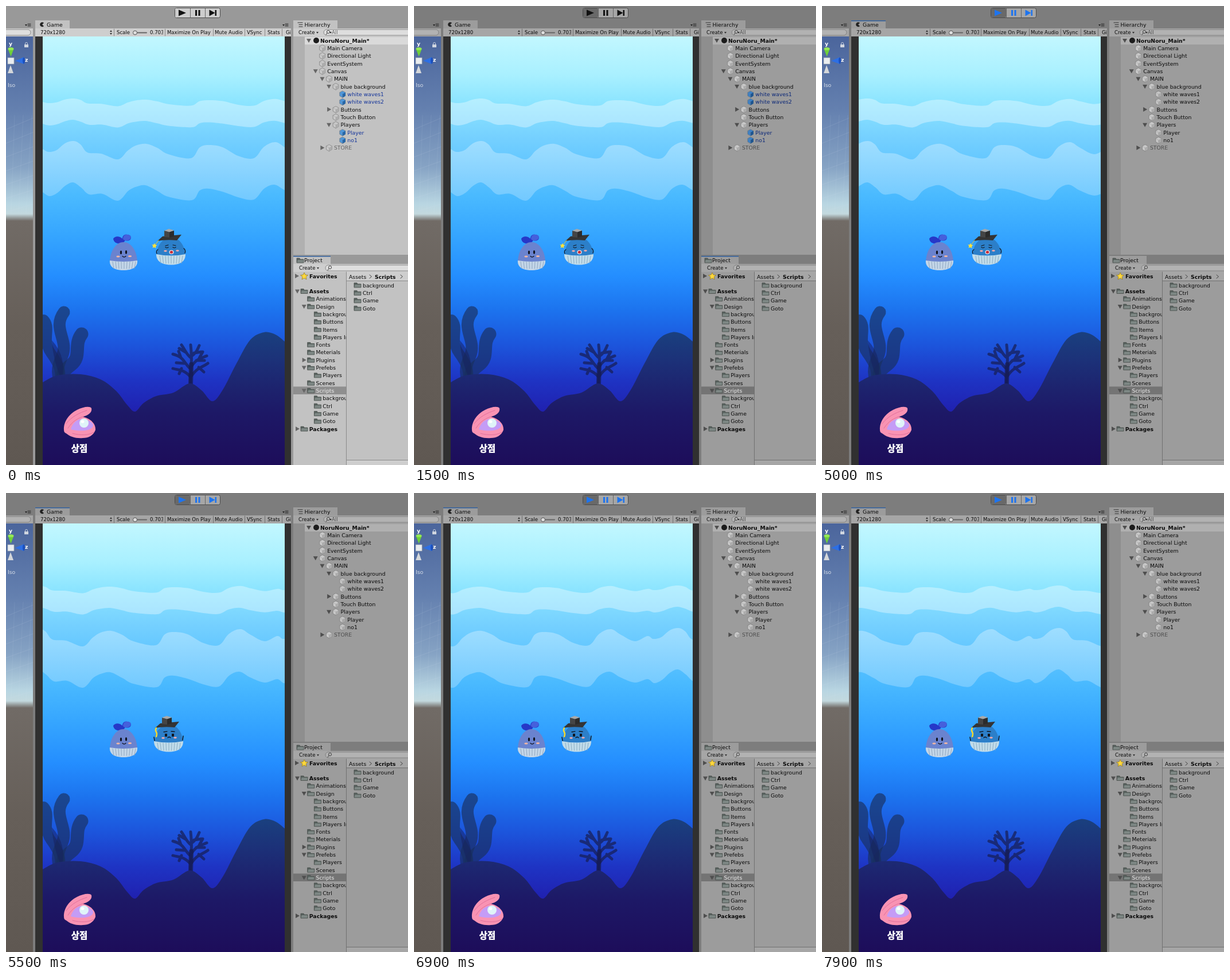
These frames come from a looping animation (701x799 px, 8 s). An HTML page:

```html
<!DOCTYPE html>
<html lang="en">
<head>
<meta charset="utf-8">
<title>Editor play mode</title>
<style>
html, body { margin: 0; width: 100%; height: 100%; overflow: hidden; background: #999; }
svg {
  display: block; width: 701px; height: 799px;
  font: 9.3px "DejaVu Sans", sans-serif;
}
#app {
  --frame: #999; --panel: #c2c2c2; --bar: #cecece; --gutter: #b0b0b0; --scene: #dadada;
  --line: #8a8a8a; --btn: #cdcdcd; --press: #cdcdcd; --icon: #111; --ink: #0a0a0a; --off: #666;
  --field: #dedede; --link: #14349a; --cube: #4d97dc; --cubeDark: #2566a8; --sel: #8f8f8f;
}
#app.play {
  --frame: #7d7d7d; --panel: #9c9c9c; --bar: #a6a6a6; --gutter: #8e8e8e; --scene: #b0b0b0;
  --line: #707070; --btn: #a6a6a6; --press: #696969; --field: #b2b2b2; --off: #4e4e4e;
  --sel: #747474; --link: #0c2878; --cube: #3d80c4; --cubeDark: #1d5590;
}
#app.run { --link: #0a0a0a; --cube: #c4c4c4; --cubeDark: #a9a9a9; }
#app.live { --icon: #1d74f0; }
text { white-space: pre; }
.s { font-size: 8.55px; }
.b { font-weight: bold; }
</style>
</head>
<body>
<script>
const put = (tag, attrs) => `<${tag} ${attrs}/>`;
const rect = (x, y, w, h, fill, more = '') =>
  put('rect', `x="${x}" y="${y}" width="${w}" height="${h}" style="fill:${fill}" ${more}`);
const path = (d, fill, more = '') => put('path', `d="${d}" style="fill:${fill}" ${more}`);
const line = (d, color, width = 1) =>
  put('path', `d="${d}" style="fill:none;stroke:${color};stroke-width:${width};stroke-linecap:round;stroke-linejoin:round"`);
const ell = (x, y, rx, ry, fill) =>
  put('ellipse', `cx="${x}" cy="${y}" rx="${rx}" ry="${ry}" style="fill:${fill}"`);
const text = (x, y, s, cls = '', color = 'var(--ink)') =>
  `<text x="${x}" y="${y}" class="${cls}" style="fill:${color}">${s}</text>`;
const gradient = (id, y1, y2, stops) =>
  `<linearGradient id="${id}" gradientUnits="userSpaceOnUse" x1="0" x2="0" y1="${y1}" y2="${y2}">` +
  stops.map(([y, c]) => `<stop offset="${(y - y1) / (y2 - y1)}" stop-color="${c}"/>`).join('') +
  '</linearGradient>';

// Smooth curve through points; the first move command is left to the caller.
function curve(p) {
  let d = '';
  for (let i = 0; i < p.length - 1; i++) {
    const a = p[i - 1] || p[i], b = p[i], c = p[i + 1], e = p[i + 2] || c;
    const n = [b[0] + (c[0] - a[0]) / 6, b[1] + (c[1] - a[1]) / 6,
               c[0] - (e[0] - b[0]) / 6, c[1] - (e[1] - b[1]) / 6, c[0], c[1]];
    d += 'C' + n.map(v => v.toFixed(1)).join(' ');
  }
  return d;
}

const PERIOD = 470;
function band(top, bottom, fill) {
  const twice = p => [...p, ...p.map(([x, y]) => [x + PERIOD, y])];
  const t = twice(top), b = twice(bottom).reverse();
  return path(`M${t[0]}${curve(t)}L${b[0]}${curve(b)}Z`, fill);
}

const arrow = (x, y, open) => path(open
  ? `M${x - 4} ${y - 3}h8l-4 7z` : `M${x - 3} ${y - 4}v8l7-4z`, 'var(--off)');
const caret = (x, y) => path(`M${x - 2} ${y - 1}h4l-2 3z`, '#333');

function cube(x, y, blue) {
  const [top, side] = blue ? ['var(--cube)', 'var(--cubeDark)'] : ['#c9c9c9', '#adadad'];
  return path(`M${x} ${y - 5.5}l5 2.5v6l-5 3l-5-3v-6z`, top, 'stroke="#777" stroke-width=".7"') +
    path(`M${x} ${y}l5-3v6l-5 3z`, side) + line(`M${x - 5} ${y - 3}l5 3v6`, '#8888', .7);
}
const folder = (x, y) =>
  path(`M${x - 6} ${y + 4}v-8h5l1 2h6v6z`, '#56605d', 'stroke="#474d4a" stroke-width=".8"') +
  path(`M${x - 5.5} ${y + 3.5}l1-4.500h10v4.500z`, '#7d8784');
const lens = (x, y) => put('circle', `cx="${x}" cy="${y}" r="2.6" fill="none" stroke="#444"`) +
  line(`M${x - 2} ${y + 2}l-2 3`, '#444');
const menu = (x, y) => path(`M${x} ${y - 1}h4l-2 3z`, '#222') +
  line(`M${x + 5} ${y - 2}h5m-5 2h5m-5 2h5`, '#333');
const search = (x, y) => rect(x, y - 5, 200, 10, 'var(--field)', 'rx="5" stroke="#777" stroke-width=".8"') + lens(x + 8, y - 1);

function toolbar() {
  return rect(0, 0, 701, 799, 'var(--frame)') +
    rect(294.5, 3.5, 79, 17, 'var(--btn)', 'rx="3" stroke="#4a4a4a"') +
    rect(295, 4, 26, 16, 'var(--press)', 'rx="2"') +
    line('M321.5 4v16M347.5 4v16', '#666') +
    path('M301 6.5v11l13-5.5zM330 7h3v10h-3zM335.5 7h3v10h-3zM354.5 6.5v11l10-5.5zM364.5 7h2.5v10h-2.5z', 'var(--icon)');
}

function sceneView() {
  let grid = '';
  for (let i = 0; i < 7; i++) grid += line(`M0 ${215 + i * 24}L47 ${195 + i * 25}`, '#d8e0ea30', .7);
  for (let i = 0; i < 4; i++) grid += line(`M${i * 15} 190L${i * 13 - 4} 360`, '#d8e0ea20', .7);
  return menu(33, 33) + rect(0, 39, 47, 14, 'var(--bar)') +
    rect(-20, 41, 63, 10, 'var(--field)', 'rx="5" stroke="#777" stroke-width=".8"') +
    rect(0, 53, 47, 746, 'url(#sky)') + grid +
    path('M8.5 88l-5-13h10z', '#6fd03a') + ell(8.5, 74.5, 5, 2.5, '#95ea55') +
    rect(3, 90, 11, 11, '#e9edf0', 'stroke="#9aa3ad" stroke-width=".7"') +
    path('M16 95.5L31 89v12z', '#2d6fe4') + ell(31, 95, 2, 5.5, '#1b50bd') +
    path('M8 103l5 14h-10z', '#d4d7da') +
    text(5, 69, 'y', 'b', '#fff') + text(33, 97, 'z', 'b', '#fff') + text(3, 141, 'Iso', '', '#d5dce6') +
    rect(32, 67, 7, 5, '#cfd5df') + line('M33.5 67v-1.5a2 2 0 0 1 4 0v1.5', '#cfd5df');
}

function gamePanel() {
  const labels = [[60, '720x1280'], [193, 'Scale'], [281, 'Maximize On Play'], [364, 'Mute Audio'],
    [420, 'VSync'], [456, 'Stats']];
  return rect(51, 25, 60, 15, 'var(--panel)') + rect(51, 25, 60, 1.5, '#2f5f9e', 'id="gameFocus"') +
    path('M66 29.5a4 4 0 1 0 0 5.5l-3-2.8z', '#222') + text(71, 36, 'Game') + menu(482, 33) +
    rect(51, 39, 446, 14, 'var(--bar)') +
    line('M188.5 40v12M277.5 40v12M361.5 40v12M416.5 40v12M451.5 40v12M481.5 40v12', 'var(--line)') +
    labels.map(([x, s]) => text(x, 49, s, 's')).join('') +
    `<svg x="251" y="39" width="23" height="14">${text(0, 10, '0.703', 's')}</svg>` +
    `<svg x="488" y="39" width="9" height="14">${text(0, 10, 'Gizmos', 's')}</svg>` +
    path('M181 45h4l-2-3zM181 47h4l-2 3z', '#333') + line('M228 46.5h17', '#666', 2) +
    put('circle', 'cx="225" cy="46.5" r="3.5" fill="#ddd" stroke="#555"') +
    rect(51, 53, 446, 746, '#303030');
}

function whale1() {
  let ribs = '';
  for (let x = 186; x < 227; x += 5) ribs += `M${x} 445l${(205 - x) * .1} 12`;
  return path('M204 413C196 415 188 413 187 405C191 399 199 401 203 405C203 397 211 396 217 400C220 407 214 410 208 408z', '#2638c8') +
    path('M204 406C204 397 212 396 217 400C219 406 214 409 207 408z', '#4560dc') +
    path('M181 445C182 424 193 411 205 411S228 424 229 445z', '#6a83cf') +
    path('M181 443Q205 447 229 443C230 454 221 460 205 460S180 454 181 443z', '#c3d6e8') +
    line(ribs, '#8ba2bd', .9) +
    ell(200.5, 429, 1.6, 3.3, '#10131f') + ell(209.5, 428.5, 1.6, 3.3, '#10131f') +
    ell(195.5, 436, 3, 1.5, '#efb6a6') + ell(216, 435.5, 3, 1.5, '#efb6a6') +
    '<g id="smile">' + line('M203 435.5q3 3 6 0', '#10131f', 1.2) + '</g>' +
    '<g id="sing">' + ell(205.5, 436.5, 3.8, 3.4, '#f2f2f2') + ell(205.5, 436.5, 2.8, 2.4, '#d02b3a') + '</g>';
}

// The second whale in its singing (true) or resting (false) pose.
function whale2(sing) {
  let ribs = '';
  for (let x = 268; x < 310; x += 5) ribs += `M${x} 435l${(288 - x) * .1} 13`;
  const ink = '#12161f';
  const face = sing
    ? line('M278 417.5l5-1.5M291 416l5 1M278 420q2.5 2 5 0M291 420q2.5 2 5 0', ink, 1.2) +
      ell(288.5, 428.5, 4, 3.5, '#f4f4f4') + ell(288.5, 428.5, 2.8, 2.5, '#c8303c') +
      line('M263 431q-2-5 2-7M312 430q2-5-2-8', ink, 1.2)
    : rect(281, 419, 4, 5, ink) + rect(293, 419, 4, 5, ink) +
      line('M279 416l6-.8M292 415l6 .5M286 426q2.5-2.5 5 0', ink, 1.3) +
      line('M263 431l-1-6M312 430l1-7', ink, 1.5);
  const tassel = sing
    ? line('M266 408l-6 8', '#e8c52c') + path('M259 413l1.5 3h3l-2.5 2.5l.5 3l-3-1.5l-3 1l1-3l-2-2.5h3z', '#ffe23a')
    : line('M266 409q-2 4 0 7t0 8', '#f5d92e', 2.5);
  return `<g id="${sing ? 'poseA' : 'poseB'}" ${sing ? '' : 'transform="translate(-4 0)"'}>` +
    path('M263 434C263 413 276 403 288 403S311 413 313 434z', '#2c7fc9') +
    path('M262 432Q288 437 313 432C313 444 305 450.5 288 450.5S262 444 262 432z', '#c1dcea') +
    line(ribs, '#86a9bf', .9) + ell(278, 426.5, 2.8, 1.4, '#f0a9ad') + ell(299, 426, 2.8, 1.4, '#f0a9ad') + face +
    path('M264 409L273 401L306 398L298 408Q280 406 264 409z', '#343434') +
    path('M276 391l9 2v10l-9-1z', '#454545') + path('M285 393l8-2v10l-8 2z', '#2b2b2b') +
    path('M276 391l8-3l9 2.5l-8 3z', '#a9a9a9') + tassel + '</g>';
}

function plants() {
  const weed = (d, w) => line(d, '#19305fa8', w);
  const twigs = 'M322 660C321 640 326 625 322 590M322 646C311 632 300 634 291 631M320 630C309 619 310 611 291 606' +
    'M323 628C331 615 338 614 350 609M322 646C334 628 341 630 352 622M322 612C314 606 312 598 306 590' +
    'M323 610C333 603 334 597 337 591M305 612L301 601M337 613L343 602M306 631L302 640M336 629L345 637' +
    'M310 622L297 621M332 617L346 617M314 603L302 596M328 604L341 602';
  return weed('M66 546C80 560 62 582 78 604S96 636 94 654', 18) +
    weed('M101 533C80 561 110 582 98 609S92 640 92 650', 21) +
    weed('M132 571C117 590 133 610 113 625S103 641 98 652', 23) +
    path('M80 582Q107 612 97 651Q82 618 80 582z', '#17205c80') +
    line(twigs, '#171c50b0', 5) + line('M322 658L323 624', '#15194aa0', 8);
}

function clam() {
  return path('M101 738C100 722 112 709 124 703C134 698 146 696 149 700C151 708 142 713 134 715C148 718 157 728 156 738C152 748 144 752 134 752C122 753 112 750 105 744C102 743 101 741 101 738z', '#f993b3') +
    path('M113 737C116 725 126 717 137 719C148 722 155 728 151 733C146 740 128 741 113 737z', '#c49cf6') +
    line('M105 727C114 715 128 708 141 704M108 735C116 722 127 717 136 714M116 744C130 748 145 747 153 742', '#dd6d98', .9) +
    put('circle', 'cx="136" cy="726" r="8" fill="#dff4f8"') + ell(133.5, 723.5, 3, 2.5, '#fff') +
    `<text x="128" y="776" text-anchor="middle" style="font:900 15.5px 'Noto Sans CJK KR','Noto Sans CJK',sans-serif;fill:#fff;stroke:#fff;stroke-width:.6">상점</text>`;
}

function game() {
  const top = [[64, 249], [74, 254], [88, 251], [103, 239], [118, 235], [130, 241], [142, 255], [166, 257], [195, 267],
    [212, 252], [226, 243], [245, 240], [264, 247], [283, 258], [322, 265], [338, 246], [355, 242], [378, 246],
    [405, 261], [432, 265], [450, 245], [470, 237], [488, 247], [512, 258]];
  const bottom = [[64, 324], [76, 331], [90, 325], [103, 313], [117, 307], [131, 316], [145, 328], [168, 327], [195, 339],
    [213, 322], [226, 315], [243, 312], [264, 322], [283, 332], [324, 338], [338, 321], [354, 318], [380, 324],
    [405, 333], [432, 337], [450, 318], [468, 311], [487, 321], [512, 330]];
  // The distant band has the same outline, flattened.
  const flat = (p, from, to) => p.map(([x, y]) => [x, to + (y - from) * .42]);
  const far = band(flat(top, 235, 161), flat(bottom, 307, 198), '#ffffff58');
  const near = band(top, bottom, 'url(#foam)');
  const hills = [[64, 655], [90, 643], [130, 641], [165, 650], [192, 670], [211, 694], [225, 706], [240, 691],
    [262, 679], [292, 673], [320, 657], [341, 669], [360, 688], [378, 668], [402, 622], [426, 581], [450, 568], [470, 572], [486, 584]];
  return '<g clip-path="url(#stage)">' + rect(64, 53, 422, 746, 'url(#sea)') +
    `<g id="waves">${far}${near}</g>` + plants() +
    path(`M${hills[0]}${curve(hills)}V799H64z`, 'url(#ground)') + clam() + whale1() + whale2(true) + whale2(false) + '</g>';
}

function hierarchy() {
  // depth, label, fold state (1 open, 0 closed), style (b blue, o off)
  const rows = [[1, 'Main Camera'], [1, 'Directional Light'], [1, 'EventSystem'], [1, 'Canvas', 1], [2, 'MAIN', 1],
    [3, 'blue background', 1], [4, 'white waves1', , 'b'], [4, 'white waves2', , 'b'], [3, 'Buttons', 0],
    [3, 'Touch Button'], [3, 'Players', 1], [4, 'Player', , 'b'], [4, 'no1', , 'b'], [2, 'STORE', 0, 'o']];
  return rect(501, 25, 77, 15, 'var(--panel)') + line('M509 29h2m1 0h5M511 32.5h6M511 36h6', '#333', 1.2) +
    text(520.5, 36, 'Hierarchy') + rect(501, 39, 200, 14, 'var(--bar)') + text(510, 49, 'Create', 's') + caret(543, 46) +
    search(554, 46) + caret(566, 46) + text(568, 49, 'All', 's', 'var(--off)') +
    rect(501, 53, 200, 380, 'var(--panel)') + rect(501, 53, 20, 380, 'var(--gutter)') +
    rect(521, 54, 180, 13, 'var(--scene)') + rect(501, 120, 200, 13, 'var(--sel)', 'id="hover"') +
    arrow(528, 60, 1) + put('circle', 'cx="541" cy="60" r="5" fill="#1c1c1c"') + text(548, 63.5, 'NoruNoru_Main*', 'b') +
    rows.map(([depth, label, fold, style], i) => {
      const x = 540 + depth * 11.7, y = 73.3 + i * 13.35;
      const color = style === 'b' ? 'var(--link)' : style === 'o' ? 'var(--off)' : 'var(--ink)';
      return (fold === undefined ? '' : arrow(x - 12, y, fold)) + cube(x, y, style === 'b') + text(x + 8.5, y + 3.5, label, '', color);
    }).join('');
}

function project() {
  const tree = [[0, 'Assets', 1], [1, 'Animations'], [1, 'Design', 1], [2, 'background'], [2, 'Buttons'], [2, 'Items'],
    [2, 'Players Image'], [1, 'Fonts'], [1, 'Meterials'], [1, 'Plugins', 0], [1, 'Prefebs', 1], [2, 'Players'],
    [1, 'Scenes'], [1, 'Scripts', 1], [2, 'background'], [2, 'Ctrl'], [2, 'Game'], [2, 'Goto'], [0, 'Packages', 0]];
  const star = 'M520 464l2 4l4.5.5l-3.5 3l1 4.5l-4-2.3l-4 2.3l1-4.5l-3.5-3l4.5-.5z';
  return rect(501, 435, 65, 15, 'var(--panel)') + rect(501, 435, 65, 1.5, '#2f5f9e', 'id="projectFocus"') +
    folder(513, 443) + text(520, 446, 'Project') +
    rect(501, 449, 200, 14, 'var(--bar)') + text(511, 459, 'Create', 's') + caret(544, 456) + search(557, 456) +
    rect(501, 463, 200, 336, 'var(--panel)') + rect(594, 463, 107, 15, 'var(--bar)') + line('M594 478.5h107', 'var(--line)') +
    rect(501, 662.5, 92, 13.5, 'var(--sel)') +
    arrow(507, 470, 0) + path(star, '#ffd83b', 'stroke="#8c7420" stroke-width=".7"') + text(529, 473.5, 'Favorites', 'b') +
    '<g clip-path="url(#treeBox)">' + tree.map(([depth, label, fold], i) => {
      const x = 520 + depth * 11.7, y = 496.5 + i * 13.31;
      return (fold === undefined ? '' : arrow(x - 12, y, fold)) + folder(x, y) +
        text(x + 8.8, y + 3.5, label, depth ? '' : 'b', label === 'Scripts' ? '#eee' : 'var(--ink)');
    }).join('') + '</g>' + line('M593.5 463v336', 'var(--line)') +
    text(598, 474.5, 'Assets') + text(643, 474.5, 'Scripts', 'b') +
    line('M634 468l3.5 3l-3.5 3M688 468l3.5 3l-3.5 3', '#444') +
    ['background', 'Ctrl', 'Game', 'Goto'].map((s, i) => folder(613, 486 + i * 13.4) + text(622, 489.5 + i * 13.4, s)).join('') +
    rect(594, 790, 107, 9, 'var(--bar)') + line('M594 790.5h107', 'var(--line)');
}

document.body.innerHTML = '<svg id="app" viewBox="0 0 701 799"><defs>' +
  gradient('sea', 53, 799, [[53, '#c2f7ff'], [120, '#a9f0ff'], [165, '#8de5ff'], [230, '#75d0ff'], [330, '#4abaff'],
    [400, '#35a5ff'], [470, '#248eff'], [530, '#1c73ee'], [590, '#1c55dc'], [650, '#1e34c4'], [710, '#201fae'], [799, '#201a90']]) +
  gradient('ground', 568, 799, [[568, '#1a407f'], [620, '#1c3078'], [665, '#1d236e'], [710, '#1d1866'], [799, '#1d0d5a']]) +
  gradient('foam', 235, 340, [[235, '#ffffff50'], [340, '#ffffff3c']]) +
  gradient('sky', 53, 799, [[53, '#4b659c'], [180, '#6480af'], [280, '#86a3c4'], [345, '#b9d6e2'], [362, '#c3d9de'],
    [374, '#716b66'], [560, '#665f59'], [799, '#5f5852']]) +
  '<clipPath id="stage"><rect x="64" y="53" width="422" height="746"/></clipPath>' +
  '<clipPath id="treeBox"><rect x="501" y="463" width="92" height="336"/></clipPath></defs>' +
  toolbar() + sceneView() + gamePanel() + game() + hierarchy() + project() + '</svg>';

const $ = id => document.getElementById(id);
const app = $('app'), waves = $('waves');
const show = (id, on) => { $(id).style.display = on ? '' : 'none'; };
const within = (t, a, b) => t >= a && t < b;

function draw() {
  const t = Math.floor(performance.now() % 8000 / 100) * 100;
  const playing = t >= 4100;
  // Game clock: it stalls while loading, then jumps ahead.
  const clock = t < 4600 ? 0 : .4 + (t - 4600) / 1000;
  app.classList.toggle('play', t >= 1500);
  app.classList.toggle('run', playing);
  app.classList.toggle('live', t >= 4200);
  waves.setAttribute('transform', `translate(${(-47 * clock).toFixed(2)} 0)`);
  const sings = !playing || within(clock % 1.33, .55, 1);
  const open = within(clock % 2.33, 1.5, 2);
  show('poseA', sings);
  show('poseB', !sings);
  show('sing', open);
  show('smile', !open);
  show('hover', within(t, 200, 300));
  show('gameFocus', playing);
  show('projectFocus', !playing);
  requestAnimationFrame(draw);
}
draw();
</script>
</body>
</html>
```
